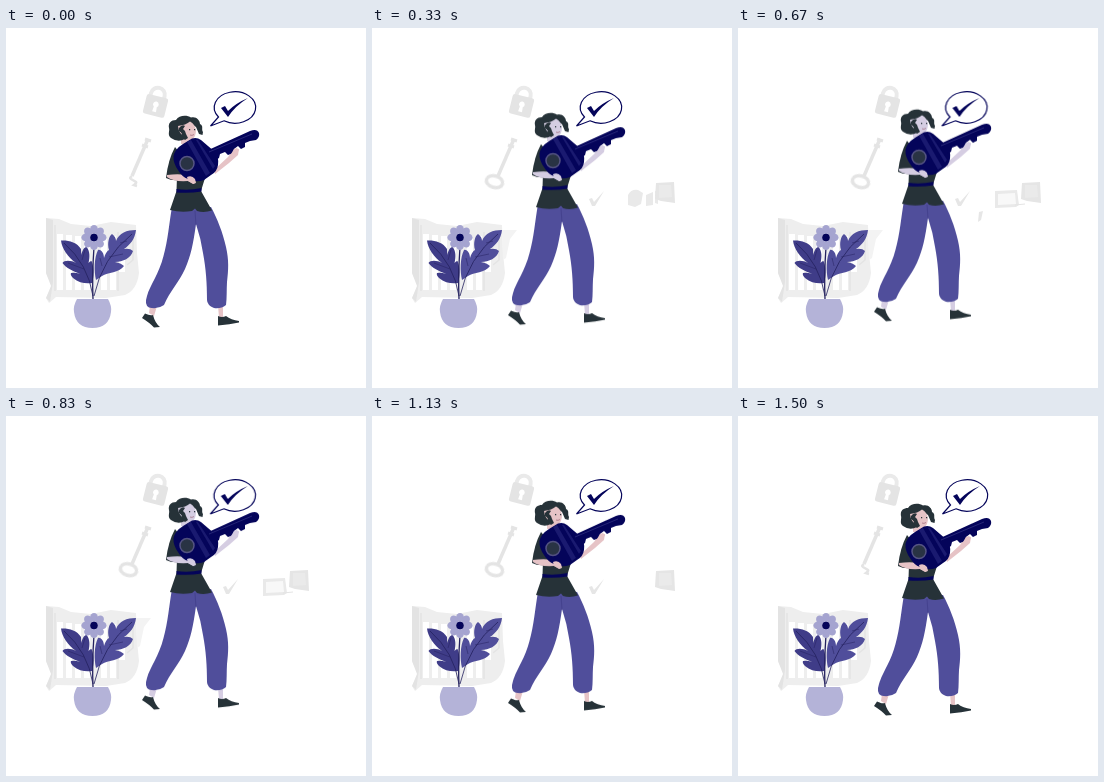
Animation of 360x360 px, one loop 1.54 s. Source, as an HTML page:

```html
<!DOCTYPE html>
<html lang="en">
<head>
<meta charset="utf-8">
<title>Key in hand</title>
<style>
  html, body { margin: 0; width: 100%; height: 100%; overflow: hidden; background: #fff; }
  svg { display: block; width: 100vw; height: 100vh; }
  :root { --navy: #04045a; --violet: #504e9b; --lilac: #b4b3d8; --dark: #263238; }
  .figure { animation: bob 1540ms cubic-bezier(.37, 0, .63, 1) infinite; }
  .skin { fill: #e6c3c6; animation: tone 1540ms step-end infinite; }
  .bubble { animation: sway 1540ms ease-in-out infinite; }
  .ring { animation: ring 1540ms step-end infinite; }
  .arc { animation: arc 1540ms step-end infinite; }
  .early { animation: early 1540ms step-end infinite; }
  .card { animation: card 1540ms step-end infinite; }
  .panel { animation: panel 1540ms step-end infinite; }
  .tick { animation: tick 1540ms step-end infinite; }
  .chip { animation: chip 1540ms step-end infinite; }
  .corner { animation: corner 1540ms step-end infinite; }
  @keyframes bob { 0%, 100% { transform: none; } 46% { transform: translateY(-6.3px); } }
  @keyframes tone { 0%, 73.3% { fill: #e6c3c6; } 21% { fill: #d5cde2; } }
  @keyframes sway {
    0%, 62%, 100% { transform: none; }
    14% { transform: translateX(.8px); }
    30% { transform: translateX(-1px); }
    44% { transform: translateX(-.6px); }
  }
  @keyframes ring { 0%, 86% { opacity: 0; } 8% { opacity: 1; } }
  @keyframes arc { 0%, 86% { opacity: 1; } 8% { opacity: 0; } }
  @keyframes early { 0%, 22% { opacity: 0; } 10% { opacity: 1; } }
  @keyframes card { 0%, 70% { opacity: 0; } 22% { opacity: 1; } }
  @keyframes panel { 0%, 82% { opacity: 0; } 9% { opacity: 1; } }
  @keyframes tick { 0%, 84% { opacity: 0; } 11% { opacity: 1; } }
  @keyframes chip { 0%, 50% { opacity: 0; } 38% { opacity: 1; } }
  @keyframes corner { 0%, 22%, 54% { opacity: 0; } 10%, 38% { opacity: 1; } }
</style>
</head>
<body>
<svg viewBox="0 0 360 360">
  <defs>
    <ellipse id="petal" cx="88" cy="201.500" rx="3.900" ry="4.600"/>
  </defs>

  <!-- barred window -->
  <path fill="#eee" d="M40 190L53 191 65 196 85 198 105 194 130 197 131 225 133 245Q131 262 119 267L100 270 50 269 43 275 40 270 46 258 40 245Z"/>
  <path class="corner" fill="#f3f3f3" d="M130 202H145L138 211 134 230 131 232Z"/>
  <path fill="#e3e3e3" d="M40 190L47 192V254L44 274 40 270 45 258 40 245Z"/>
  <path stroke="#fff" stroke-width="6" d="M54 206v56M63 207v55M72 208v54M81 208v54M98 208v54M107 208v54M116 208v36"/>
  <path fill="none" stroke="#e4e4e4" stroke-width="1.500" d="M49 197v66M112 204v59M127 202v30l-6 5"/>

  <!-- padlock -->
  <g transform="rotate(14 150 76)">
    <path fill="none" stroke="#eaeaea" stroke-width="4" d="M142.500 70v-3.500a7 7 0 0 1 14 0v4"/>
    <rect x="139" y="68" width="22" height="20" rx="2.500" fill="#e4e4e4"/>
    <path fill="#fff" d="M150 73.500a3 3 0 0 1 1.500 5.500l.5 5h-4l.5-5a3 3 0 0 1 1.500-5.500z"/>
  </g>

  <!-- small key -->
  <g fill="none" stroke="#e4e4e4">
    <path stroke-width="3.500" d="M142 111l-16 37"/>
    <path stroke-width="3" d="M139 111l6 2M136 117l6 2"/>
    <ellipse class="ring" cx="122.700" cy="153.500" rx="8.300" ry="5.800" stroke-width="3.500" transform="rotate(16 122 153)"/>
    <path class="arc" stroke-width="2.500" d="M126 148q-3 2-1 3l5 3q1 1-2 3l3 1"/>
  </g>

  <!-- floating cards -->
  <g class="early" fill="#e9e9e9">
    <path d="M256 167Q259 161 266 162L271 165 269 176 263 179 256 177Z"/>
    <path d="M274 167L281 164V177L274 178ZM283 163L286 162V176L283 175Z"/>
  </g>
  <g class="card">
    <path fill="#e9e9e9" d="M257 163l22-1 2 15-3 2-21 1z"/>
    <path fill="#f8f8f8" d="M260 166l17-1 1 11-18 1z"/>
    <path stroke="#e4e4e4" d="M277 177l10-1"/>
  </g>
  <g class="panel">
    <path fill="#e5e5e5" d="M284 155L302 154 303 175 289 173 283 171Z"/>
    <path fill="#eaeaea" d="M287 157h12l1 12-13 1z"/>
  </g>
  <path class="tick" fill="#e6e6e6" d="M217 171l3-1 2 4 10-11-9 15h-3z"/>
  <path class="chip" fill="#e6e6e6" d="M241 184l4-1-2 9-3 2z"/>

  <!-- plant -->
  <g>
    <path fill="#3f3c88" d="M55 212.500C62 212 71 214 75 221Q75 224 75.500 227C76 223 78 219 80.500 219 84 223 84 229 82.500 235Q84 233 85.500 233C88.500 240 88 249 86 255 80 256 73 255 67 250Q64 247 65 245 69 244 74 246C67 243 60 240 56.500 235 58 232 65 232 70 235 62 229 56 221 55 212.500Z"/>
    <path fill="var(--violet)" d="M130 202C129 211 124 217 118 221Q124 220 127 223C125 230 117 234 109 234Q115 235 118 238C113 245 102 244 96 248L90 252C88 243 88 230 92 222 95 221 98 225 98 230 99 226 101 223 103 222 101 215 103 208 106 206 109 208 110 211 110 213 113 205 121 202 130 202Z"/>
    <path fill="none" stroke="#24215f" stroke-width=".8" d="M58 215Q82 236 87 268M126 206Q96 230 88 268"/>
    <path fill="none" stroke="#24215f" stroke-width="1.300" d="M88 219q-2 28-1 52"/>
    <path fill="none" stroke="#24215f" stroke-width=".5" d="M62 235l16 6M79 222l-3 10M114 215l7-2M103 229l14-3M96 238l-2-8"/>
    <g id="flower" fill="#a5a4d0"></g>
    <circle cx="88" cy="209.500" r="3.800" fill="var(--navy)"/>
    <path fill="var(--lilac)" d="M71 271h31q4 7 3 13-2 16-18.500 16T68 284q-1-6 3-13z"/>
  </g>

  <!-- speech bubble -->
  <g class="bubble">
    <path fill="#fff" stroke="var(--navy)" stroke-width="1.200" d="M212.500 89A20.700 15.700 0 1 1 218 92.800L204.500 98Z"/>
    <path fill="var(--navy)" d="M215 80l4-2 3 5q8-8 20-13-13 8-20 19z"/>
  </g>

  <!-- walking figure -->
  <g class="figure">
    <path class="skin" d="M144 278h7l-3 10-5-3zM212 277h5v13h-4z"/>
    <path fill="var(--dark)" d="M136 290L139 285.500Q144 288 147 287 149 295 154 299L148 299.500Q144 295 136 290ZM212 288q4 2 8 0 5 4 13 5v1.500q-9 2-21 3z"/>
    <path fill="var(--violet)" d="M166 179H205C211 190 217 205 220 219 223 232 222.500 242 221 254 220.500 262 221 270 220 277Q215 281 208 280 201 277 201 272C201 255 200 241 197 225Q195 211 190 196C187 217 185 227 179 241 173 254 164 263 158 277Q151 282 143 279.500 138 277 141 268C144 257 153 246 157.500 228 162 212 163 196 166 179Z"/>
    <path fill="none" stroke="#403d88" stroke-width=".7" d="M190 197l-1-14"/>

    <!-- shirt and arms -->
    <path fill="var(--dark)" d="M172 120L196 118 199 150 195 163 206 182.500Q198 185 191 183L189 180.500 186 183Q175 185 164 182L170.500 163 171 148Z"/>
    <path fill="var(--dark)" d="M169 119Q162 132 160 150 166 153 173 152L178 130Z"/>
    <path fill="var(--navy)" d="M170.500 161q12 2 25-1v3.500q-12 2-25 1z"/>
    <path class="skin" d="M161 147Q174 145 187 148L190 152 188 156 182 153Q167 154 161 149Z"/>
    <path class="skin" d="M208 142L222 129 227 122 233 121 232 127 223 135 209 146Z"/>

    <!-- head -->
    <path class="skin" d="M175 105h10v11h-10z"/>
    <path fill="var(--dark)" d="M165 110C161 107 164 103 163 100 162 95 165 92 170 92 173 87 181 87 185 89.500 190 88 194 92 194 96 198 98 195 101 197 104L196.500 107 193 106 190 99 184 95 179 111Q172 115 165 110Z"/>
    <path class="skin" d="M172 98Q180 97 184 93.500 189 96 190 102 190 109 186 111.500 182 112 179 108 173 107 172 98Z"/>
    <path fill="var(--dark)" d="M173 100Q176 96 179 98L177 101Q180 103 180 106L182 110 179 112 176 109Q177 105 173 103ZM183 101h1.200v1.200H183zM188 101h1.200v1.200H188z"/>
    <path fill="none" stroke="#9b6577" stroke-width=".7" d="M184 107q2 1 4-.5"/>

    <!-- large key -->
    <g fill="var(--navy)">
      <path d="M167.500 128Q169 121 177 116L186 110.500Q191 109 195 112L209 124Q213 128 212 137 211 144 205 147L198 152Q190 155 182 151 176 149 172 142 167 135 167.500 128Z"/>
      <path d="M198 124L244 103Q251 100 253 105 254 109 250 112L244 113 239 115V119L235 121 232 118 228 121 227 125 222 127 219 124 214 126 213 130 205 135Z"/>
    </g>
    <path fill="#1a1a70" d="M181 114l4-2 19 33-4 3zM190 112l2 0 17 26-2 3z"/>
    <path stroke="#303080" stroke-width=".8" d="M203 124l43-18"/>
    <circle cx="181" cy="135.500" r="7" fill="#293344" stroke="#555483" stroke-width="1.500"/>
    <path class="skin" d="M181 149q5-2 8 2l1 4-3 1-5-3z"/>
    <path class="skin" d="M225 126l3-5 3-1 2 2-3 5z"/>
  </g>
</svg>
<script>
  const flower = document.getElementById('flower');
  for (let i = 0; i < 8; i++) {
    const petal = document.createElementNS('http://www.w3.org/2000/svg', 'use');
    petal.setAttribute('href', '#petal');
    petal.setAttribute('transform', `rotate(${i * 45} 88 209.5)`);
    flower.append(petal);
  }
</script>
</body>
</html>
```
